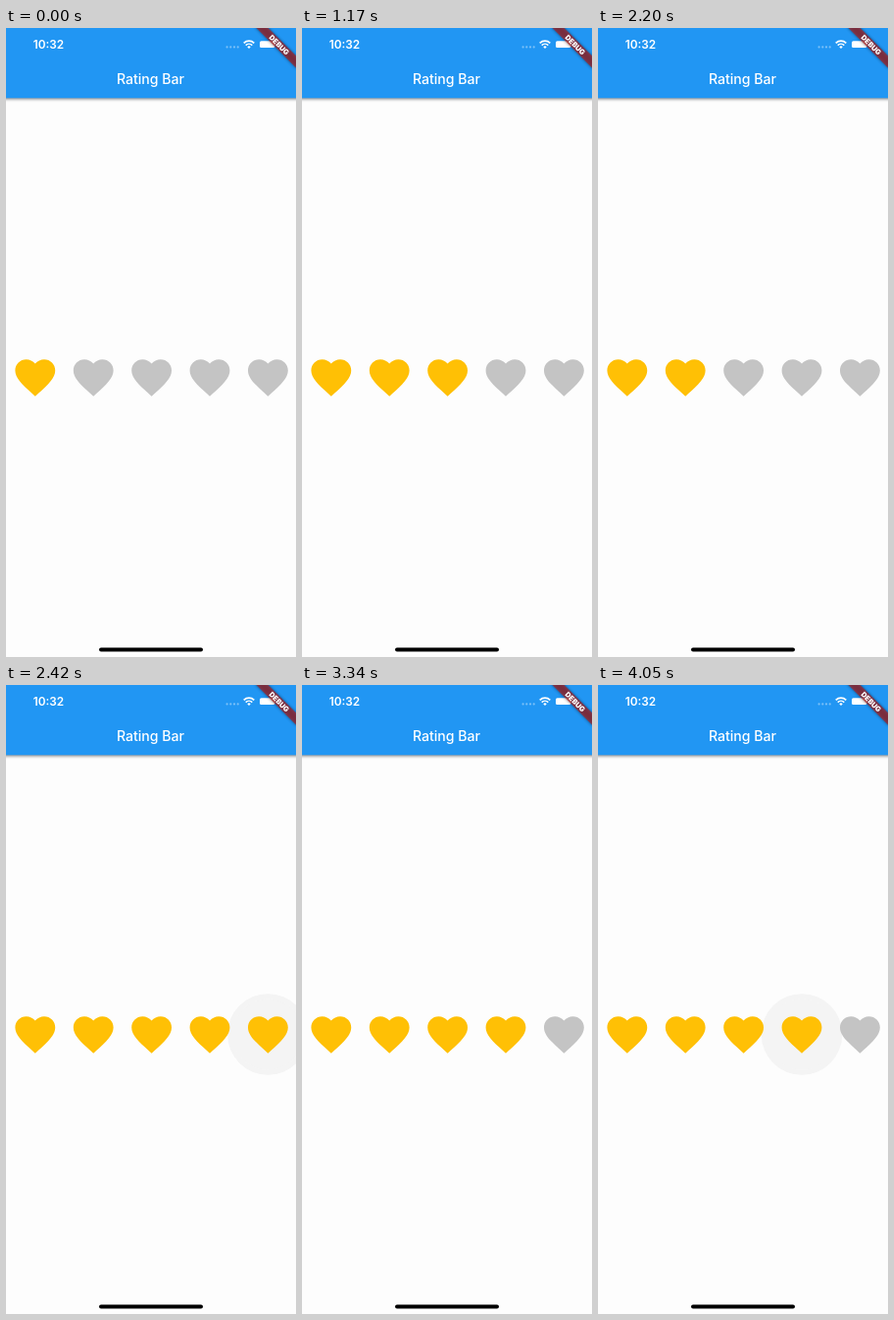
Animation, 296 px wide and 640 px high, one loop 4.13 s. Source, as an HTML page:

```html
<!DOCTYPE html>
<html lang="en">
<head>
<meta charset="utf-8">
<title>Rating Bar</title>
<style>
  html, body { margin: 0; width: 100%; height: 100%; overflow: hidden; background: #fdfdfd; }
  svg { display: block; width: 296px; height: 640px; }
  text { font-family: Inter, Roboto, sans-serif; fill: #fff; }
</style>
</head>
<body>
<svg viewBox="0 0 296 640" xmlns="http://www.w3.org/2000/svg">
  <defs>
    <path id="heart" d="M12 21.35l-1.45-1.32C5.4 15.36 2 12.28 2 8.5 2 5.42 4.42 3 7.5 3c1.74 0 3.41.81 4.5 2.09C13.09 3.81 14.76 3 16.5 3 19.58 3 22 5.42 22 8.5c0 3.78-3.4 6.86-8.55 11.54z"/>
    <filter id="blur" x="-20%" y="-100%" width="140%" height="300%"><feGaussianBlur stdDeviation="1.6"/></filter>
  </defs>
  <rect width="296" height="640" fill="#fdfdfd"/>

  <g id="ink">
    <circle id="highlight" cy="355.5" r="41.3"/>
    <circle id="splash" cy="355.5" r="36"/>
  </g>
  <g id="hearts"></g>

  <!-- app bar -->
  <rect x="-4" y="10" width="304" height="62.5" fill="#000" opacity=".45" filter="url(#blur)"/>
  <rect width="296" height="71.3" fill="#2196f3"/>
  <text x="147.5" y="56.6" font-size="14.1" font-weight="500" text-anchor="middle">Rating Bar</text>

  <!-- status bar -->
  <text x="43.5" y="21" font-size="11.8" font-weight="600" text-anchor="middle">10:32</text>
  <g fill="#fff" opacity=".4">
    <circle cx="225.6" cy="19.4" r="1.1"/><circle cx="229.3" cy="19.4" r="1.1"/>
    <circle cx="233" cy="19.4" r="1.1"/><circle cx="236.7" cy="19.4" r="1.1"/>
  </g>
  <g fill="none" stroke="#fff" stroke-width="1.7">
    <path d="M242.7 15.4a7.5 7.5 0 0 1 10.6 0"/>
    <path d="M244.7 17.6a4.7 4.7 0 0 1 6.6 0"/>
  </g>
  <path d="M246.3 19.2a2.4 2.4 0 0 1 3.4 0L248 21z" fill="#fff"/>
  <rect x="259" y="13.2" width="15.5" height="6.9" rx="1.6" fill="#fff"/>

  <!-- corner banner -->
  <g transform="translate(296 0) rotate(45)">
    <rect x="-30" y="20" width="60" height="8.6" fill="#000" opacity=".5" filter="url(#blur)"/>
    <rect x="-30" y="20" width="60" height="8.6" fill="#b71c1c" opacity=".63"/>
    <text y="26.9" font-size="7.3" font-weight="900" text-anchor="middle">DEBUG</text>
  </g>

  <rect x="95" y="630.5" width="106" height="4" rx="2" fill="#000"/>
</svg>
<script>
const LOOP = 4130;
const ON = '#ffc005', OFF = '#c4c4c4';
const FULL = '#f1f1f1', FADED = '#f4f4f4', FAINT = '#f8f8f8';

// start time, rating, pressed heart (0 = none), ink colour, splash colour
const STEPS = [
  [0, 1, 0],
  [940, 1, 3, FULL],
  [1050, 3, 3, FADED],
  [1170, 3, 0],
  [1580, 3, 2, FULL],
  [1680, 2, 2, FADED],
  [1780, 2, 2, FAINT],
  [2200, 2, 0],
  [2310, 2, 5, FULL],
  [2420, 5, 5, FADED],
  [2530, 5, 0],
  [2870, 4, 4, FULL],
  [3340, 4, 0],
  [3450, 4, 3, FULL],
  [3560, 3, 3, FADED],
  [3670, 3, 0],
  [3950, 3, 4, FAINT, FULL],
  [4050, 4, 4, FADED]
];

const byId = id => document.getElementById(id);
const heartX = n => 29.8 + 59.4 * (n - 1);
const ink = byId('ink'), highlight = byId('highlight'), splash = byId('splash');

const hearts = [1, 2, 3, 4, 5].map(n => {
  const use = document.createElementNS('http://www.w3.org/2000/svg', 'use');
  use.setAttribute('href', '#heart');
  use.setAttribute('transform', `translate(${heartX(n) - 24.5} 331.1) scale(2.042)`);
  return byId('hearts').appendChild(use);
});

function render(t) {
  const [, rating, pressed, color, splashColor] = STEPS.findLast(step => step[0] <= t);
  hearts.forEach((heart, i) => heart.setAttribute('fill', i < rating ? ON : OFF));
  ink.setAttribute('visibility', pressed ? 'visible' : 'hidden');
  if (!pressed) return;
  ink.setAttribute('transform', `translate(${heartX(pressed)} 0)`);
  highlight.setAttribute('fill', color);
  splash.setAttribute('fill', splashColor || color);
}

const start = performance.now();
function tick() {
  render((performance.now() - start) % LOOP);
  requestAnimationFrame(tick);
}
tick();
</script>
</body>
</html>
```
